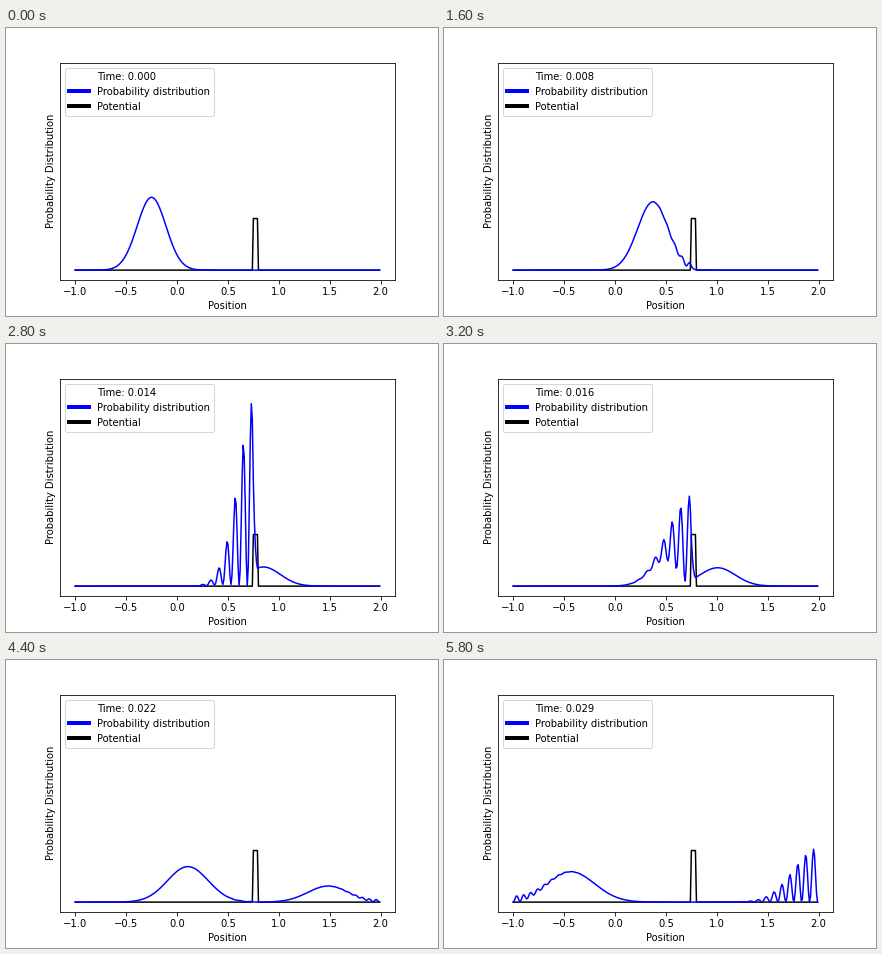
Recreate the animation shown at these times as a matplotlib script. Size 432 by 288 pixels, loop 6 s.

```python
import numpy as np
import matplotlib.pyplot as plt
from matplotlib.animation import FuncAnimation
from matplotlib.lines import Line2D

FRAMES, INTERVAL, DT = 30, 200, 0.001

# Wave packet on a grid, hitting a thin barrier between hard walls
n, dx = 300, 0.01
x = -1 + dx * np.arange(n)
x0, sigma, k0 = -0.25, 0.2, 40.0
barrier = np.zeros(n)
barrier[175:180] = 2000.0

psi0 = np.exp(-(x - x0) ** 2 / (2 * sigma ** 2) + 1j * k0 * x)
psi0 /= np.sqrt(np.sum(np.abs(psi0) ** 2) * dx)

# H = -d2/dx2 + V on the inner points
m = n - 2
H = np.diag(2 / dx ** 2 + barrier[1:-1])
H -= (np.eye(m, k=1) + np.eye(m, k=-1)) / dx ** 2
energy, modes = np.linalg.eigh(H)
coef = modes.T @ psi0[1:-1]


def density(t):
    out = np.zeros(n)
    out[1:-1] = np.abs(modes @ (coef * np.exp(-1j * energy * t))) ** 2
    return out


plt.rcParams.update({"font.family": "DejaVu Sans", "font.size": 10})
fig = plt.figure(figsize=(6, 4), dpi=72, facecolor="white")
fig.subplots_adjust(left=0.125, right=0.9, bottom=0.125, top=0.88)
ax = fig.add_subplot()
ax.plot(x, barrier / 1000, color="black")
wave, = ax.plot(x, density(0), color="blue")
ax.set_xlim(-1.1495, 2.1395)
ax.set_ylim(-0.383, 8.045)
ax.set_yticks([])
ax.set_xlabel("Position")
ax.set_ylabel("Probability Distribution")

handles = [Line2D([], [], linestyle="none"),
           Line2D([], [], color="blue", lw=4),
           Line2D([], [], color="black", lw=4)]
legend = ax.legend(handles, ["Time: 0.000", "Probability distribution", "Potential"],
                   loc="upper left")
clock = legend.get_texts()[0]


def update(i):
    t = i * DT
    wave.set_ydata(density(t))
    clock.set_text(f"Time: {t:.3f}")
    return wave, clock


anim = FuncAnimation(fig, update, frames=FRAMES, interval=INTERVAL,
                     repeat=True, repeat_delay=0, blit=False)
plt.show()
```
